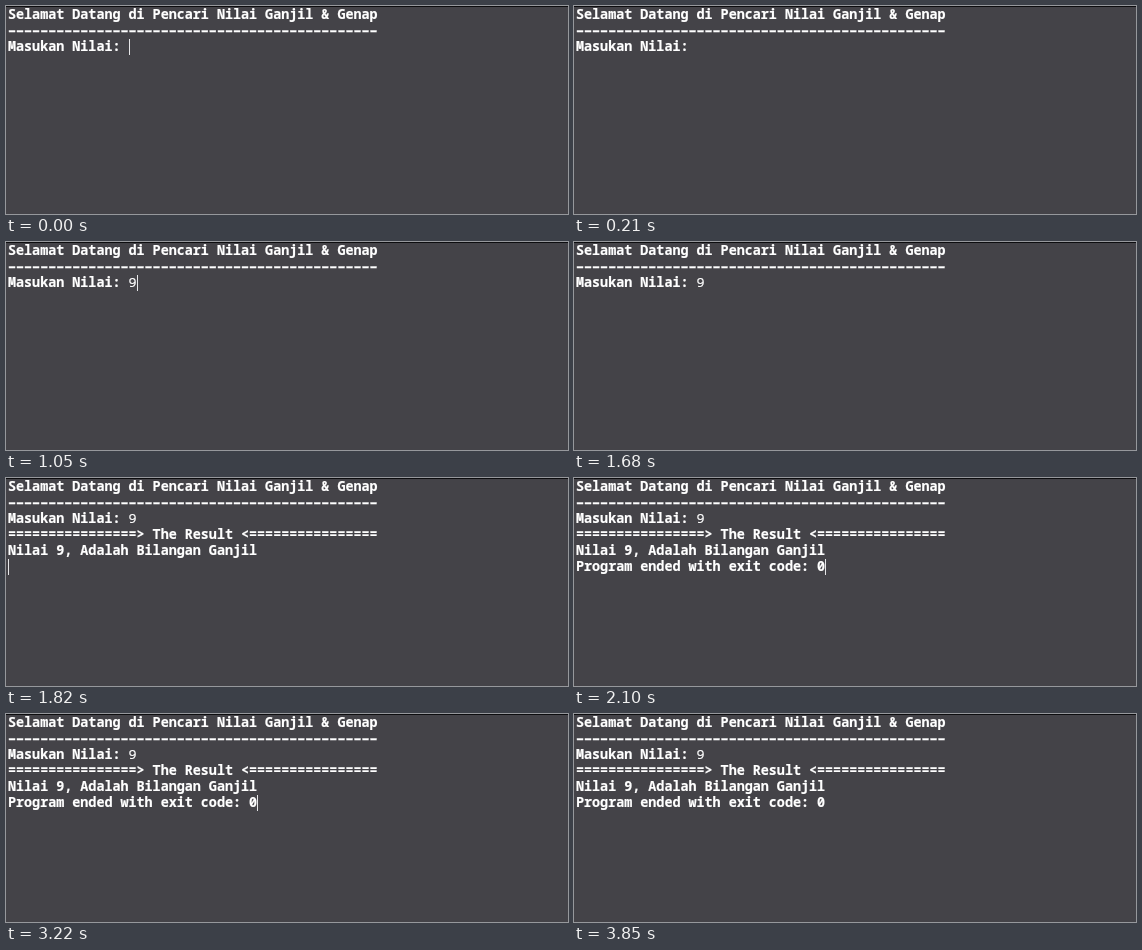
Write an HTML page that moves like this. It is 562 by 208 pixels and loops after 3990 ms.

```html
<!DOCTYPE html>
<html lang="id">
<head>
<meta charset="utf-8">
<title>Ganjil &amp; Genap</title>
<style>
  html, body { margin: 0; width: 100%; height: 100%; overflow: hidden; background: #444348; }
  svg { display: block; width: 562px; height: 208px; }
  text { font: 700 13.4px "Noto Sans Mono", "DejaVu Sans Mono", monospace; fill: #fff; stroke: #fff; stroke-width: .2px; white-space: pre; }
  .typed { font-weight: 500; }

  /* 3990 ms loop, every change is a hard cut */
  .typed, .result, .exit, .caret { animation: 3990ms step-end infinite; }
  .typed { animation-name: typed; }
  .result { animation-name: result; }
  .exit { animation-name: exit; }
  .caret { animation-name: move, blink; fill: #e6e6e8; }

  @keyframes typed { 0% { opacity: 0 } 26.316%, 100% { opacity: 1 } }
  @keyframes result { 0% { opacity: 0 } 45.614%, 100% { opacity: 1 } }
  @keyframes exit { 0% { opacity: 0 } 52.632%, 100% { opacity: 1 } }
  @keyframes move {
    0% { transform: translate(123px, 33px) }
    26.316% { transform: translate(131px, 33px) }
    45.614% { transform: translate(2px, 81px) }
    52.632%, 100% { transform: translate(251px, 81px) }
  }
  @keyframes blink {
    0%, 19.298%, 45.614%, 80.702% { opacity: 1 }
    5.263%, 42.105%, 66.667%, 96.491%, 100% { opacity: 0 }
  }
</style>
</head>
<body>
<svg viewBox="0 0 562 208">
  <rect width="562" height="208" fill="#444348"/>
  <rect width="562" height="1" fill="#0c0c0e"/>
  <text x="2" y="13">Selamat Datang di Pencari Nilai Ganjil &amp; Genap</text>
  <text x="2" y="30">−−−−−−−−−−−−−−−−−−−−−−−−−−−−−−−−−−−−−−−−−−−−−−</text>
  <text x="2" y="45">Masukan Nilai:</text>
  <text class="typed" x="122.6" y="45">9</text>
  <g class="result">
    <text x="2" y="61">================&gt; The Result &lt;================</text>
    <text x="2" y="77">Nilai 9, Adalah Bilangan Ganjil</text>
  </g>
  <text class="exit" x="2" y="93">Program ended with exit code: 0</text>
  <rect class="caret" width="1" height="16"/>
</svg>
</body>
</html>
```
